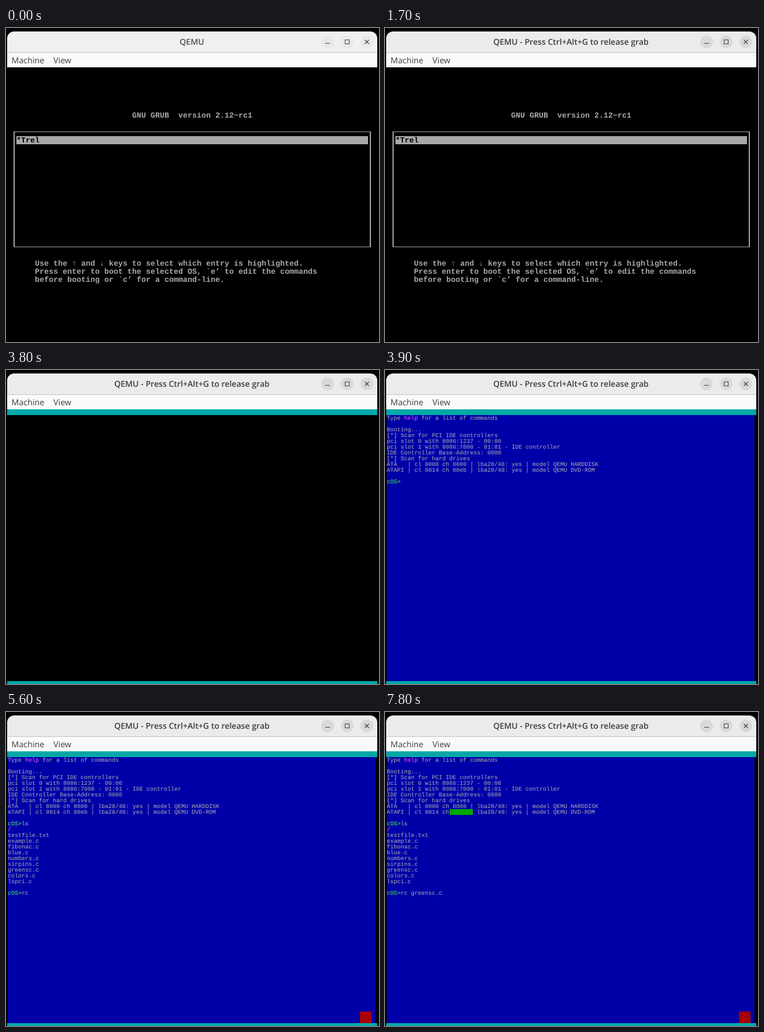
Write an HTML page that moves like this. It is 645 px wide and 543 px high and loops after 8 s.

```html
<!DOCTYPE html>
<html lang="en">
<head>
<meta charset="utf-8">
<title>Boot to shell</title>
<style>
  html, body { margin: 0; width: 100%; height: 100%; overflow: hidden; background: #000; }
  svg { display: block; width: 645px; height: 543px; }
  text { white-space: pre; text-rendering: geometricPrecision; }
  .ui { font: 400 14.3px "Open Sans", "Noto Sans", sans-serif; fill: #3d3d3d; }
  .title { font-size: 14.1px; font-weight: 600; text-anchor: middle; }
  .grub { font: 700 13.333px "Liberation Mono", monospace; fill: #a8a8a8; }
  .shell { font: 400 10px "Liberation Mono", monospace; fill: #b0b0b0; }
</style>
</head>
<body>
<svg id="stage" viewBox="0 0 645 543" xmlns="http://www.w3.org/2000/svg">
  <rect width="645" height="543" fill="#000"/>

  <g id="window">
    <path id="bar" d="M2 42V18a12 12 0 0 1 12-12H630a12 12 0 0 1 12 12V42Z"/>
    <rect x="2" y="42" width="640" height="1" fill="#c4c4c4"/>
    <rect x="2" y="43" width="640" height="25" fill="#fafafa"/>
    <text id="title" class="ui title" x="321.5" y="29"></text>
    <text class="ui" x="9.5" y="61">Machine</text>
    <text class="ui" x="82" y="61">View</text>
    <g id="buttons">
      <circle cx="556" cy="24" r="11"/>
      <circle cx="590" cy="24" r="11"/>
      <circle cx="624" cy="24" r="11"/>
    </g>
    <g fill="none" stroke="#3d3d3d">
      <path d="M552 26.5h8"/>
      <rect x="586.5" y="20.5" width="7" height="7"/>
      <path d="M620.5 20.5l7 7m0-7l-7 7" stroke-width="1.2"/>
    </g>
  </g>

  <g id="grub" class="grub">
    <text x="218" y="155">GNU GRUB  version 2.12~rc1</text>
    <path d="M13 179h618v200h-618zM15 180v198h614v-198z" fill-rule="evenodd"/>
    <rect x="18" y="187" width="608" height="14"/>
    <text x="18" y="198" fill="#000" style="fill:#000">*Trel</text>
    <text x="50" y="411">Use the ↑ and ↓ keys to select which entry is highlighted.</text>
    <text x="50" y="425">Press enter to boot the selected OS, `e’ to edit the commands</text>
    <text x="50" y="439">before booting or `c’ for a command-line.</text>
  </g>

  <rect id="cursor" x="2" y="142" width="8" height="3" fill="#a8a8a8"/>

  <g id="bands" fill="#00a8a8">
    <rect x="2" y="68" width="640" height="10"/>
    <rect x="2" y="538" width="640" height="5"/>
  </g>

  <g id="shell" class="shell">
    <rect x="3" y="78" width="636" height="460" fill="#0000a8"/>
    <g id="boot"></g>
    <g id="listing"></g>
    <rect id="fill" x="112" y="168" height="10" fill="#00a800"/>
    <rect id="key" x="612" y="518" width="20" height="20" fill="#a80000"/>
  </g>
</svg>

<script>
const LOOP = 8000;
const GREEN = '#54fc54', PINK = '#fc54fc';
const $ = id => document.getElementById(id);

// Puts text on the shell's 6 x 10 character grid.
function put(parent, row, col, str, color) {
  const el = document.createElementNS('http://www.w3.org/2000/svg', 'text');
  el.setAttribute('x', 3 + col * 6);
  el.setAttribute('y', 86 + row * 10);
  if (color) el.style.fill = color;
  el.textContent = str;
  parent.appendChild(el);
  return el;
}

const boot = $('boot'), listing = $('listing');

put(boot, 0, 0, 'Type');
put(boot, 0, 5, 'help', PINK);
put(boot, 0, 10, 'for a list of commands');
[
  'Booting...',
  '[*] Scan for PCI IDE controllers',
  'pci slot 0 with 8086:1237 - 00:00',
  'pci slot 1 with 8086:7000 - 01:01 - IDE controller',
  'IDE Controller Base-Address: 0000',
  '[*] Scan for hard drives',
  'ATA   | cl 0000 ch 0000 | lba28/48: yes | model QEMU HARDDISK',
  'ATAPI | cl 0014 ch 00eb | lba28/48: yes | model QEMU DVD-ROM'
].forEach((s, i) => put(boot, 2 + i, 0, s));
put(boot, 11, 0, 'cOS>', GREEN);
const first = put(boot, 11, 4, '');

put(listing, 12, 0, '/', PINK);
['testfile.txt', 'example.c', 'fibonac.c', 'blue.c', 'numbers.c',
 'sirpins.c', 'greensc.c', 'colors.c', 'lspci.c']
  .forEach((s, i) => put(listing, 13 + i, 0, s));
put(listing, 23, 0, 'cOS>', GREEN);
const second = put(listing, 23, 4, '');

const lsTimes = [4300, 4500];
const rcTimes = [5100, 5300, 5600, 5800, 5900, 6000, 6200, 6300, 6400, 6600, 6700, 6800];
// Spans in which the key light flips every 100 ms.
const bursts = [[4300, 4800], [5100, 5400], [5600, 6800], [7100, 7200]];

const show = (id, on) => $(id).setAttribute('visibility', on ? 'visible' : 'hidden');
const typed = (str, times, t) => str.slice(0, times.filter(k => k <= t).length);

function keyLit(t) {
  let flips = 0;
  for (const [a, b] of bursts)
    if (t >= a) flips += Math.floor((Math.min(t, b) - a) / 100) + 1;
  return flips % 2 === 1;
}

function render(t) {
  const grabbed = t >= 1700;
  $('title').textContent = grabbed ? 'QEMU - Press Ctrl+Alt+G to release grab' : 'QEMU';
  $('title').style.fill = grabbed ? '#3d3d3d' : '#505050';
  $('bar').setAttribute('fill', grabbed ? '#ebebeb' : '#f0f0f0');
  $('buttons').setAttribute('fill', grabbed ? '#d9d9d9' : '#e8e8e8');

  show('grub', t < 3100);
  show('cursor', t >= 3200 && t < 3500);
  show('bands', t >= 3800);
  $('shell').style.display = t >= 3900 ? '' : 'none';

  first.textContent = typed('ls', lsTimes, t);
  show('listing', t >= 4700);
  second.textContent = typed('rc greensc.c', rcTimes, t);
  show('key', keyLit(t));
  $('fill').setAttribute('width', t < 7200 ? 0 : 10 * (Math.floor((t - 7200) / 200) + 1));
}

const start = performance.now();
function tick() {
  render((performance.now() - start) % LOOP);
  requestAnimationFrame(tick);
}
tick();
</script>
</body>
</html>
```
